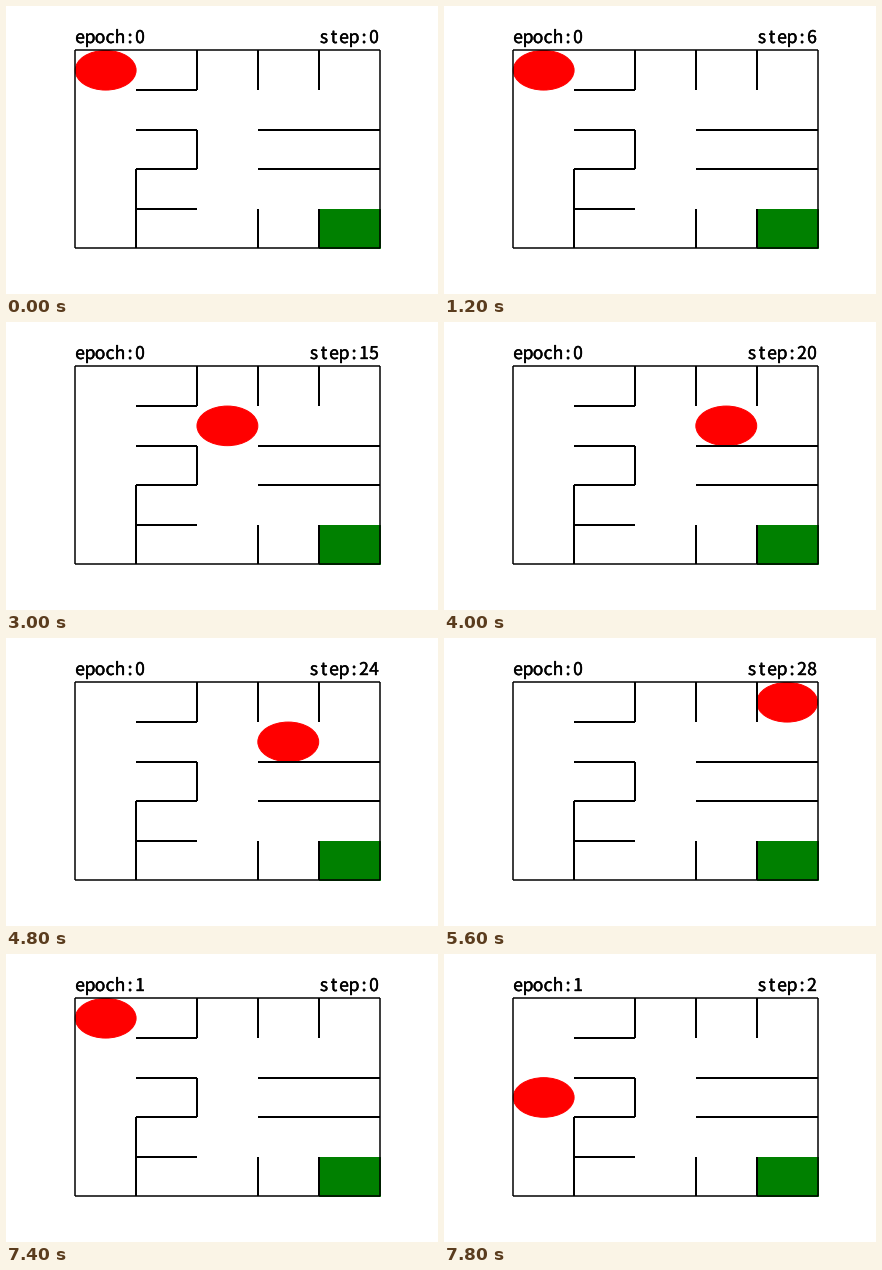
A matplotlib script for the animation above (8 s loop, 432 by 288 pixels).

```python
import matplotlib.pyplot as plt
from matplotlib.animation import FuncAnimation
from matplotlib.patches import Ellipse, Rectangle
from matplotlib.patheffects import withStroke

W, H, DPI = 432, 288, 72
SIZE = 5
STEP_MS = 200

# One letter per step; a dot is a bump into a wall
EPISODES = ["R..L...R..LDR.RU..DRU..DRU...D.L.LD.", "DD"]
MOVES = {"U": (0, -1), "D": (0, 1), "L": (-1, 0), "R": (1, 0), ".": (0, 0)}

# Walls as (x0, y0, x1, y1) in cells, y pointing down
BORDER = [(0, 0, 5, 0), (0, 5, 5, 5), (0, 0, 0, 5), (5, 0, 5, 5)]
WALLS = [
    (1, 1, 2, 1), (1, 2, 2, 2), (3, 2, 5, 2), (1, 3, 2, 3), (3, 3, 5, 3),
    (1, 4, 2, 4), (2, 0, 2, 1), (3, 0, 3, 1), (4, 0, 4, 1), (2, 2, 2, 3),
    (1, 3, 1, 5), (3, 4, 3, 5), (4, 4, 4, 5),
]


def walk(episodes):
    """List (epoch, step, column, row) for every state visited."""
    states = []
    for epoch, moves in enumerate(episodes):
        x = y = 0
        states.append((epoch, 0, x, y))
        for step, move in enumerate(moves, 1):
            dx, dy = MOVES[move]
            x, y = x + dx, y + dy
            states.append((epoch, step, x, y))
    return states


def draw_walls(ax, walls, width):
    for x0, y0, x1, y1 in walls:
        ax.plot([x0, x1], [y0, y1], color="black", lw=width,
                solid_capstyle="butt")


class MonoLabel:
    """Text laid out on a fixed pitch, in pixels from the top left."""

    PITCH = 10

    def __init__(self, fig, x, baseline, length, align="left"):
        self.align = align
        left = x if align == "left" else x - length * self.PITCH
        self.chars = [
            fig.text((left + (i + 0.5) * self.PITCH) / W, 1 - baseline / H, "",
                     ha="center", va="baseline", fontsize=17.5,
                     family="Noto Sans CJK JP", color="black",
                     path_effects=[withStroke(linewidth=0.4,
                                              foreground="black")])
            for i in range(length)
        ]

    def set(self, text):
        n = len(self.chars)
        padded = text.ljust(n) if self.align == "left" else text.rjust(n)
        for artist, char in zip(self.chars, padded):
            artist.set_text(char.strip())


fig = plt.figure(figsize=(W / DPI, H / DPI), dpi=DPI, facecolor="white")
ax = fig.add_axes([0.125, 0.11, 0.775, 0.77])
ax.axis("off")

ball = ax.add_patch(Ellipse((0.5, 0.5), 1, 1, color="red"))
ax.add_patch(Rectangle((SIZE - 1, SIZE - 1), 1, 1, color="green"))
draw_walls(ax, BORDER, 1.5)
draw_walls(ax, WALLS, 2)
ax.set_xlim(-0.25, SIZE + 0.25)
ax.set_ylim(SIZE + 0.35, -0.25)

epoch_label = MonoLabel(fig, 69, 37, 7)
step_label = MonoLabel(fig, 373, 37, 7, align="right")
states = walk(EPISODES)


def draw(i):
    epoch, step, x, y = states[i]
    ball.set_center((x + 0.5, y + 0.5))
    epoch_label.set(f"epoch:{epoch}")
    step_label.set(f"step:{step}")
    return [ball, *epoch_label.chars, *step_label.chars]


anim = FuncAnimation(fig, draw, frames=len(states), interval=STEP_MS,
                     repeat=True, repeat_delay=0)
plt.show()
```
